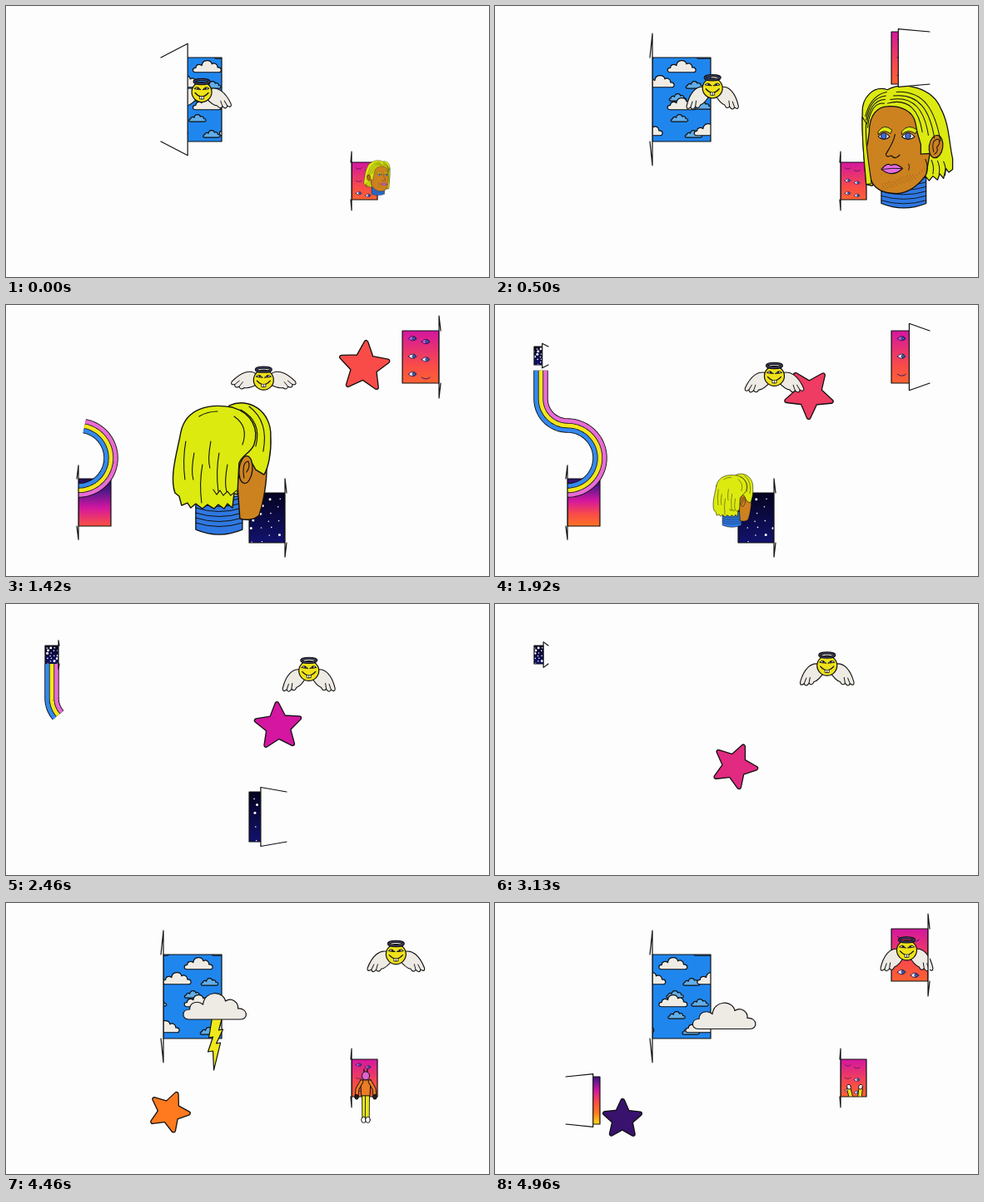
An HTML page with a canvas that plays this animation: 580x326 px, repeating every 5000 ms.

```html
<!DOCTYPE html>
<html lang="en">
<head>
<meta charset="utf-8">
<title>Little doors</title>
<style>
html, body { margin: 0; width: 100%; height: 100%; overflow: hidden; background: #fdfdfd; }
canvas { display: block; width: 580px; height: 326px; }
</style>
</head>
<body>
<canvas id="stage" width="580" height="326"></canvas>
<script>
const c = document.getElementById('stage').getContext('2d');
const LOOP = 5000, SWING = .43;
const INK = '#111', PAPER = '#fdfdfd', HAIR = '#dcea10', SKIN = '#cd8220', BLUE = '#2f78e2';
const RAMP = [[13, 9, 64], [86, 24, 140], [212, 22, 160], [249, 76, 72], [255, 122, 30], [255, 217, 26]];
const rad = Math.PI / 180;
const clamp = v => Math.max(0, Math.min(1, v));
const fract = v => v - Math.floor(v);
const rgb = v => `rgb(${v.map(Math.round)})`;

// A curve through rows of [time, ...values]
function smooth(keys, t) {
  let i = 0;
  while (i < keys.length - 2 && t > keys[i + 1][0]) i++;
  const a = keys[i], b = keys[i + 1], p = keys[i - 1] || a, q = keys[i + 2] || b;
  const d = b[0] - a[0], f = clamp((t - a[0]) / d), g = f * f, h = g * f;
  return a.slice(1).map((v, j) => {
    j++;
    const m = (b[j] - p[j]) / (b[0] - p[0]) * d, n = (q[j] - a[j]) / (q[0] - a[0]) * d;
    return (2 * h - 3 * g + 1) * v + (h - 2 * g + f) * m + (3 * g - 2 * h) * b[j] + (h - g) * n;
  });
}
function rampColor(k) {
  const i = Math.max(0, Math.min(4, Math.floor(k)));
  return rgb(RAMP[i].map((v, j) => v + (RAMP[i + 1][j] - v) * (k - i)));
}

function shape(path, fill, width = 1.2, stroke = INK) {
  const p = typeof path === 'string' ? new Path2D(path) : path;
  if (fill) { c.fillStyle = fill; c.fill(p); }
  if (width) { c.strokeStyle = stroke; c.lineWidth = width; c.stroke(p); }
}
function oval(x, y, rx, ry, fill, width = 1.2, turn = 0, stroke = INK) {
  const p = new Path2D();
  p.ellipse(x, y, rx, ry, turn, 0, 7);
  shape(p, fill, width, stroke);
}
function place(x, y, s, draw, flip = 1) {
  c.save();
  c.translate(x, y); c.scale(s * flip, s);
  draw();
  c.restore();
}
function clipped(path, draw) {
  c.save();
  c.clip(path);
  draw();
  c.restore();
}

const CLOUD = 'M-31 15C-40 15-40 3-30 3C-30-6-20-8-14-3C-12-20 10-20 13-7C20-12 29-6 28 2C40 1 41 15 31 15Z';
const cloud = (x, y, s, fill) => place(x, y, s, () => shape(CLOUD, fill, 1.2 / s));

// Contents of the windows
function sky(w, t) {
  c.fillStyle = '#1f86ee';
  c.fillRect(w.x, w.y, w.w, w.h);
  const tile = 72;
  const layer = (list, speed, s, fill) => list.forEach(([x, y]) => {
    const left = fract((x - 168 - speed * (t - .88)) / tile) * tile + 168;
    for (let k = -1; k < 2; k++) cloud(left + tile * k, y, s, fill);
  });
  layer([[246, 59], [233, 95], [213, 110], [243, 120], [215, 135], [232, 154]], 16.9, .27, '#62aee9');
  layer([[211, 73], [257, 91], [211, 118], [243, 149]], 34.6, .45, '#efece5');
}
function fillRamp(w, y0, y1) {
  const g = c.createLinearGradient(0, y0, 0, y1);
  RAMP.forEach((col, i) => g.addColorStop(i / 5, rgb(col)));
  c.fillStyle = g;
  c.fillRect(w.x, w.y, w.w, w.h);
}
function eyes(w, t) {
  fillRamp(w, w.y - 1.33 * w.h, w.y + 2 * w.h);
  for (let i = 0; i < 6; i++) {
    const x = w.x + w.w * (.28 + i % 2 * .36), y = w.y + w.h * (.15 + (i >> 1) * .34 + i % 2 * .06);
    place(x, y, w.w / 44, () => {
      if (Math.sin(t * 2.6 + i * .5 - 2.4) < -.55) return shape('M-5 0Q0 4 5 0', null, 1, '#3a1470');
      shape('M-5 0Q0-6 5 0Q0 5-5 0Z', i < 2 ? '#d65bd8' : '#f6eef2', .9, '#26105a');
      oval(1.5, -.2, 1.8, 2, '#3a62d8', .7);
    });
  }
}
function dusk(w, t) {
  const k = (1 - Math.cos((t - .88) / 1.36 * 2 * Math.PI)) / 2;
  fillRamp(w, w.y - 10 + 6 * k, w.y + w.h + 42 * k);
}
function night(w, t) {
  const g = c.createLinearGradient(0, w.y, 0, w.y + w.h);
  g.addColorStop(0, '#05031f'); g.addColorStop(1, '#12126e');
  c.fillStyle = g;
  c.fillRect(w.x, w.y, w.w, w.h);
  for (let i = 1; i < 19; i++) {
    oval(w.x + fract(i * .755 - t * .15) * w.w, w.y + fract(i * .57) * w.h, i % 3 ? .8 : 1.5, i % 3 ? .8 : 1.5, '#fff', 0);
  }
}

// side: -1 hinged on the left, 1 on the right; times: [starts opening, starts closing]
const windows = [
  { x: 189, y: 62, w: 70, h: 101, side: -1, gap: 3, draw: sky, times: [[-.25, .98], [3.88, 9]] },
  { x: 415, y: 188, w: 31, h: 45, side: -1, gap: 1, draw: eyes, times: [[-1, .75], [3.7, 9]] },
  { x: 476, y: 31, w: 44, h: 63, side: 1, gap: 2, draw: eyes, times: [[.42, 1.7], [4.5, 9]] },
  { x: 87, y: 209, w: 39, h: 57, side: -1, gap: 2, draw: dusk, times: [[.68, 2], [4.87, 9]] },
  { x: 292, y: 226, w: 43, h: 60, side: 1, gap: 2, draw: night, times: [[.95, 2.17]] },
  { x: 47, y: 50, w: 16, h: 22, side: 1, gap: 1, draw: night, times: [[1.66, 3]] }
];
const opening = (w, t) => w.times.reduce((p, [a, b]) => p + clamp((t - a) / SWING) - clamp((t - b) / SWING), 0);

function pane(w, t) {
  if (opening(w, t) <= 0) return;
  const frame = new Path2D();
  frame.rect(w.x, w.y, w.w, w.h);
  clipped(frame, () => w.draw(w, t));
  shape(frame, null);
}
function door(w, t) {
  const p = opening(w, t);
  if (p <= 0) return;
  const near = w.side < 0 ? w.x : w.x + w.w, hinge = near + w.side * w.gap;
  const free = near - w.side * w.w * (1 - p), grow = w.h / 2 * .57 * p;
  shape(`M${hinge} ${w.y}L${free} ${w.y - grow}V${w.y + w.h + grow}L${hinge} ${w.y + w.h}`, PAPER);
}

// The big head
function neck(x0, x1, y0, y1) {
  const q = (x0 + x1) / 2;
  shape(`M${x0} ${y0}V${y1 - 6}Q${q} ${y1 + 6} ${x1} ${y1 - 6}V${y0}Z`, BLUE, 1.3);
  for (let y = y0 + 2; y < y1 - 8; y += 6) shape(`M${x0} ${y}Q${q} ${y + 9} ${x1} ${y}`, null, 1);
}
const FACE = new Path2D('M-48-20C-48-44-36-54-24-54C-6-55 10-48 13-32C15-18 18-10 20-4V9L32 8L27 36C20 46 8 60-12 61C-30 61-42 54-46 42C-48 26-57 20-53 6L-50-6Z');
function features() {
  for (const [x, r] of [[-41, 7], [-9, 8]]) {
    shape(`M${x - r}-21Q${x}-32 ${x + r + 4}-23L${x + r + 2}-18Q${x}-25 ${x - r}-17Z`, HAIR, 1);
    shape(`M${x - r}-14Q${x}-24 ${x + r + 1}-14Q${x}-7 ${x - r}-14Z`, '#fff');
    oval(x, -15, 3.6, 4.2, '#4169d0', .9);
  }
  shape('M-26-17C-28-6-34 2-38 9Q-38 14-31 11Q-25 17-20 10', null, 1.3);
  shape('M-44 29Q-36 19-31 24Q-25 20-16 28Q-30 41-44 29Z', '#e56ce0');
  shape('M-42 29Q-30 27-18 28M-8 22Q-6 26-8 30', null, 1);
  for (let i = 0; i < 90; i++) {
    const x = -44 + fract(i * .618) * 64;
    oval(x, 36 + fract(i * .377) * 22 - Math.max(0, x) * .7, .5, .5, '#6d4212', 0);
  }
}
function frontView(turn) {
  neck(-32, 27, 38, 80);
  shape('M-57-45C-58-66-42-82-24-76C-2-88 35-78 46-52C58-30 57-6 62 15V29L57 33L53 28L50 41L45 35L42 43L36 38L31 44L26 38L18 46L-42 47L-44 51L-52 49C-54 20-58-10-57-45Z', HAIR, 1.4);
  shape(FACE, SKIN, 1.4);
  clipped(FACE, () => {
    c.translate(14 * (1 - turn), 0);
    features();
  });
  shape('M-52-32C-54-4-48 22-45 48L-52 49C-54 20-58-10-57-40Z', HAIR);
  oval(40, -1, 9, 15, SKIN, 1.3, .15);
  shape('M37 6Q33-10 43-11Q47-6 41 0Q44 5 38 9', null, 1.1);
  for (let i = 0; i < 4; i++) {
    shape(`M${-24 + i * 4} ${-58 - i * 5}C${4 + i * 7} ${-66 - i * 3} ${18 + i * 7} -48 ${22 + i * 8} ${-20 + i * 4}`, null, 1.1);
    shape(`M${-28 + i} ${-58 - i * 5}C${-40 - i * 2} ${-60 - i * 3} ${-48 - i} -48 ${-50 - i} ${-26 - i * 5}`, null, 1.1);
    shape(`M${26 + i * 8} ${16 + i}q4 8 2 18`, null, 1.1);
  }
}
function backView() {
  neck(-34, 22, 32, 78);
  shape('M14-12L51-6C52 14 47 40 42 55C36 61 26 61 19 59Z', SKIN, 1.4);
  shape('M6-77C30-88 57-70 56-40C57-20 53-2 48 6L38 0L30-14L18 10L4-40Z', HAIR, 1.4);
  oval(26, 0, 8, 16.5, SKIN, 1.3, .1);
  shape('M24 10Q21-9 29-10Q32-4 27 3', null, 1.1);
  shape('M-52-45C-46-74-18-80 10-75C34-68 42-48 36-30C32-20 22-18 18-8L16 30L12 29L10 46L4 41L0 47L-7 42L-12 47L-20 42L-26 47L-34 41L-40 46L-44 40L-51 43L-54 32L-59 28C-66 8-56-22-52-45Z', HAIR, 1.4);
  shape('M-13 24l4 6l4-5l4 6l5-5l4 5l7-6M20-72Q46-58 38-28M30-76Q54-58 47-22M12-64Q30-52 22-30M-30-64Q-20-70-8-70', null, 1.1);
  for (let i = 0; i < 6; i++) shape(`M${-46 + i * 10} ${-34 + i % 3 * 14}q-4 22 -1 ${46 - i % 2 * 14}`, null, 1.1);
}
function bigHead(t) {
  const s = Math.min(1, .26 + 1.3 * t, (2.16 - t) * 1.7);
  if (s <= 0) return;
  const [x, y] = smooth([[0, 446, 207], [.5, 493, 170], [.7, 500, 198], [.88, 475, 195], [1.42, 262, 198], [2.16, 314, 256]], t);
  const turn = t / .44 - 1;
  place(x, y, s, () => t < 1.15 ? frontView(Math.abs(turn)) : backView(), turn < 0 ? -1 : 1);
}

// Winged smiley
function wing(side, angle) {
  c.save();
  c.scale(side, 1); c.rotate(angle);
  shape('M7-7C14-15 26-12 38-2Q41 2 35 2Q36 7 30 5Q29 10 24 7Q18 9 7 4Z', '#eeeae4', 1.1);
  shape('M35 2L29-2M30 5L25 0', null, .9);
  c.restore();
}
function angel(t) {
  const lift = 21 + 17 * Math.sin((165 + 562 * t) * rad);
  place(235 + 52.3 * t, 103.5 - 9.4 * t, 1, () => {
    for (const side of [-1, 1]) wing(side, lift * rad);
    oval(0, 0, 12, 12, '#efe21a');
    oval(0, -12.5, 9, 2.6, null, 3.2);
    oval(0, -12.5, 9, 2.6, null, .8, 0, '#5b5b98');
    for (const side of [-1, 1]) {
      shape(`M${side * 1.5}-3Q${side * 5}-8 ${side * 9}-4Q${side * 5}-3 ${side * 1.5}-3Z`, '#fff', 1);
      oval(side * 4.5, -4.3, 1.2, 1.1, INK, 0);
    }
    shape('M-8 1Q0 10 8 1', null, 1.3);
    shape('M-2.5 5.4V8.5H2.5V5.4M0 5.5V8.5', '#fff', .8);
  });
}

// Tumbling star, its spin slowing down
function star(t) {
  if (t < .55) return;
  const [x, y] = smooth([[.55, 505, 62], [.88, 488, 67], [1.42, 430, 74], [2.46, 327, 147], [3.75, 253, 232], [4.96, 153, 260]], t);
  const [tint] = smooth([[.88, 0], [1.42, 3], [2.46, 2], [3.75, 3], [4.46, 4], [4.96, .6]], t);
  const r = Math.min(34.5 - 2 * t, 4 + 95 * (t - .55)), since = t - .88, spin = 34 - 90 * since + 6 * since * since;
  const fill = rampColor(Math.max(0, tint)), p = new Path2D();
  for (let i = 0; i < 10; i++) {
    const q = (i % 2 ? .47 : 1) * Math.max(1, r - 2.5), a = (spin + i * 36) * rad;
    p.lineTo(x + q * Math.cos(a), y + q * Math.sin(a));
  }
  p.closePath();
  shape(p, fill, 6);
  shape(p, fill, 3.4, fill);
}

// Rainbow: half turn, quarter turn the other way, then straight up
const HALF = 39 * Math.PI, BEND = HALF + 16 * Math.PI, END = BEND + 41;
function track(u, d) {
  const arc = (y, r, a) => [87 + r * Math.cos(a), y + r * Math.sin(a)];
  if (u < HALF) return arc(184, 39 + d, Math.PI / 2 - u / 39);
  if (u < BEND) return arc(113, 32 - d, Math.PI / 2 + (u - HALF) / 32);
  return [55 + d, 113 - (u - BEND)];
}
function rainbow(t) {
  const head = END * (1 - (1 - clamp(t - 1.1)) ** 2), tail = Math.max(0, 300 * (t - 1.96));
  if (head - tail < 1) return;
  const band = (d, width, color) => {
    const p = new Path2D();
    for (let i = 0; i <= 60; i++) p.lineTo(...track(tail + (head - tail) * i / 60, d));
    shape(p, null, width, color);
  };
  c.lineCap = 'butt';
  band(0, 17.5, INK);
  ['#3489ee', '#f2e61e', '#e76cd6'].forEach((color, i) => band(5.5 * (i - 1), 4.7, color));
  c.lineCap = 'round';
}

// Tiny climber: drops in, hangs on the sill, pulls up, dives through
const PANTS = '#e9e51c', SHIRT = '#ea7d25', SILL = 234;
function limb(points, width, color) {
  const p = new Path2D();
  points.forEach(q => p.lineTo(...q));
  shape(p, null, width + 1.8);
  shape(p, null, width, color);
}
function dive(t) {
  const y = 200 + 66 * (t - 4.64), inside = new Path2D();
  inside.rect(415.6, 188.6, 29.8, 43.8);
  clipped(inside, () => {
    for (const s of [-1, 1]) {
      limb([[434 + s * 2, y + 30], [432 + s * 7, y + 3]], 3.6, PANTS);
      oval(432 + s * 7, y, 2.3, 3, '#fff', 1, s * .3);
    }
  });
}
function climber(t) {
  if (t < 3.1) return;
  if (t > 4.64) return dive(t);
  const effort = Math.max(0, (t - 4.16) / .3), pull = clamp(effort);
  const top = Math.min(255, 150 + 335 * (t - 3.75)) - 42 * effort;
  const x = 435.5 - 3.5 * clamp((t - 3.75) * 3), hand = t < 4.06 ? top - 20 : SILL, spread = 6 - 3.5 * pull;
  for (const s of [-1, 1]) {
    limb([[x + s * 2, top + 19], [x + s * spread * .7, top + 46]], 4, PANTS);
    oval(x + s * spread, top + 48, 4 - pull * 1.2, 2.2 + pull * 1.4, '#fff', 1);
  }
  shape(`M${x - 6} ${top}H${x + 6}L${x + 5} ${top + 19}H${x - 5}Z`, SHIRT, 1);
  for (const s of [-1, 1]) {
    limb([[x + s * 5, top + 2], [x + s * (6 + 4 * pull), (top + hand) / 2], [x + s * (6 + 5 * pull), hand]], 3, SHIRT);
    oval(x + s * (6.5 + 4.5 * pull), hand - 1, 2.2, 2.8, '#222', 1);
  }
  oval(x, top - 5, 4.6, 5, '#d966d2', 1);
  shape(`M${x - 2} ${top - 10}v-3M${x + 2} ${top - 10}v-3`, null, 1.3);
}

function storm(t) {
  if (t <= 4) return;
  const x = 250.5 + 49 * (t - 4.46), y = 125 + 23 * (t - 4.46);
  if (t > 4.36 && t < 4.64) {
    place(x, y, 1, () => shape('M-3 13H9L5 28L10 27L2 44L7 43L-1 76L-2 53L-8 54L-2 36L-7 37Z', '#efe91c'));
  }
  cloud(x, y, Math.min(1, .1 + 2.1 * (t - 4)), '#eeeae4');
}

function render(t) {
  c.fillStyle = PAPER;
  c.fillRect(0, 0, 580, 326);
  c.lineJoin = c.lineCap = 'round';
  const [skyDoor, headDoor, ...others] = windows;
  windows.forEach(w => pane(w, t));
  door(headDoor, t);
  [rainbow, storm, star, angel, climber, bigHead].forEach(draw => draw(t));
  [skyDoor, ...others].forEach(w => door(w, t));
}

const start = performance.now();
function tick() {
  render((performance.now() - start) % LOOP / 1000);
  requestAnimationFrame(tick);
}
tick();
</script>
</body>
</html>
```
